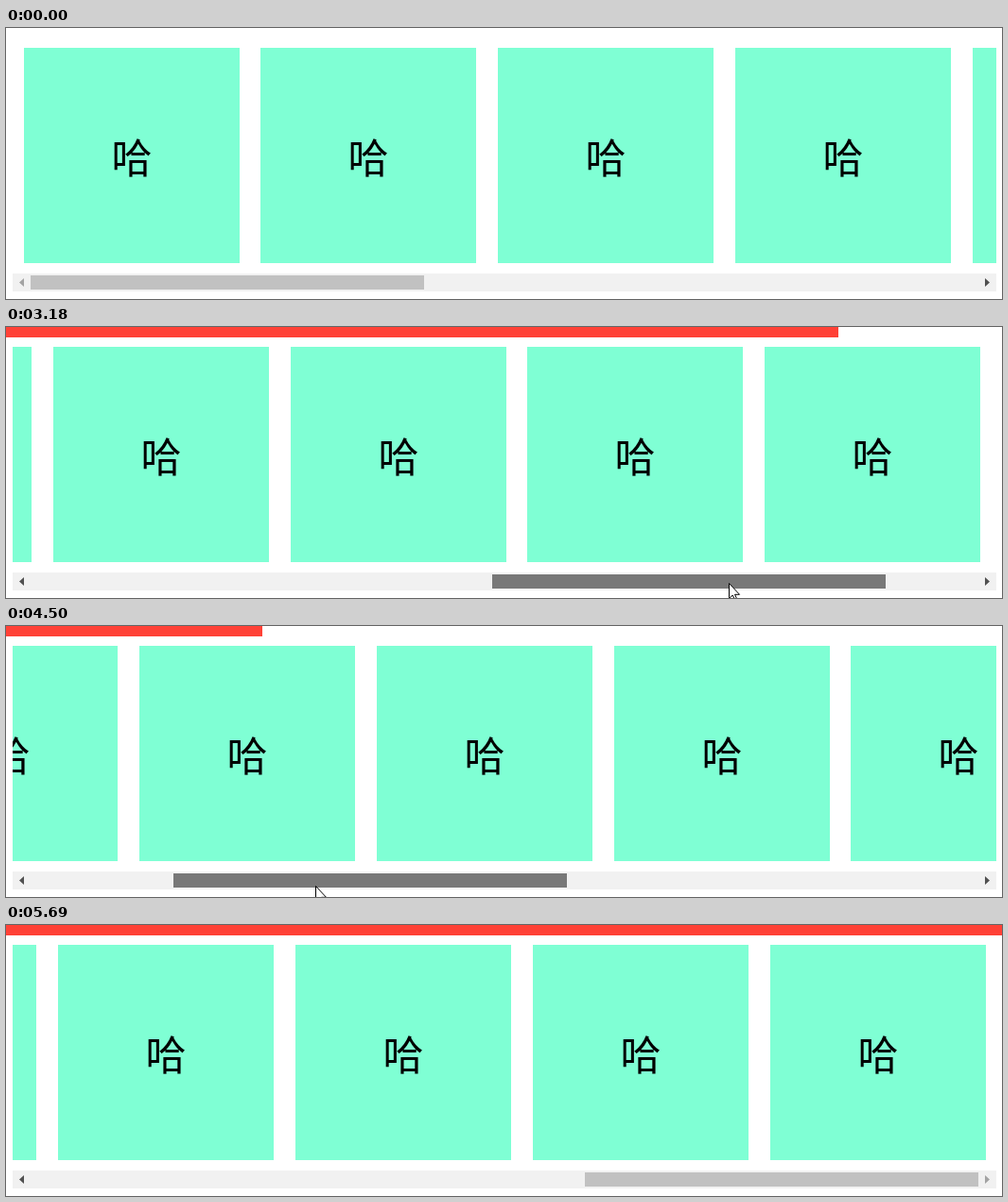
Recreate the animation shown at these times as an HTML page. Size 1053 by 287 pixels, loop 6630 ms.

```html
<!DOCTYPE html>
<html lang="zh-CN">
<head>
<meta charset="utf-8">
<title>Horizontal scroll progress</title>
<style>
  html, body { margin: 0; width: 100%; height: 100%; overflow: hidden; background: #fff; }
  svg { display: block; }
  rect { shape-rendering: crispEdges; }
  text { font: 43px "Noto Sans CJK SC", "Noto Sans CJK", "Noto Sans CJK JP", sans-serif; text-anchor: middle; }
  .card { fill: #7fffd4; }
  .bar { fill: #ff4136; }
  .track { fill: #f1f1f1; }
</style>
</head>
<body>
<svg width="1053" height="287">
  <svg id="list" x="7" y="0" width="1040" height="260" viewBox="7 0 1040 260" overflow="hidden"></svg>
  <rect id="bar" class="bar" height="11"/>
  <rect class="track" x="7" y="260" width="1040" height="19"/>
  <path id="prev" d="M14 269.5l5-4.5v9z"/>
  <path id="next" d="M1040 269.5l-5-4.5v9z"/>
  <rect id="thumb" y="262" width="416" height="15"/>
  <path id="cursor" d="M.5.5v16l3.7-3.5 2.6 5.5 2.2-1-2.5-5.2h5z" fill="#fff" stroke="#000"/>
</svg>
<script>
const LOOP = 6630, MAX = 1468.2, PITCH = 250.8, COUNT = 10;
const ENTER = 1690, HOVER = 1720, GRAB = 2780, RELEASE = 5600, LEAVE = 5680;
const $ = id => document.getElementById(id);
const list = $('list'), bar = $('bar'), thumb = $('thumb'), cursor = $('cursor');

list.innerHTML = Array(COUNT).fill(
  '<g><rect class="card" y="21" width="228" height="228"/><text x="114" y="154">哈</text></g>'
).join('');
const cards = [...list.children];

const clamp = (v, lo, hi) => Math.min(hi, Math.max(lo, v));

const ease = (t, from, to) => {
  const u = clamp((t - from) / (to - from), 0, 1);
  return u * u * (3 - 2 * u);
};

// Three drags: right, back left, right again
const scrollAt = t =>
  MAX * (ease(t, 2837.6, 3300) - ease(t, 3700, 4898.6) + ease(t, 5050, 5420));

// The pointer makes the same sweeps, a little ahead of the thumb
const pointerX = t => 187 + 3 * ease(t, 2300, 2380)
  + 600 * (ease(t, GRAB, 3238) - ease(t, 3476, 4960) + ease(t, 4961, 5430))
  + 270 * ease(t, 5520, LEAVE);

const pointerY = t => 281 - 9 * ease(t, 1700, HOVER) - 2 * ease(t, 2600, 2620)
  + 5 * ease(t, 2900, 3900) - 41 * ease(t, 4500, 5150)
  + 54 * ease(t, 5520, LEAVE);

function thumbColor(t) {
  if (t < HOVER || t >= RELEASE) return '#c1c1c1';
  return t < GRAB ? '#a8a8a8' : '#787878';
}

const arrowColor = off => off ? '#a3a3a3' : '#505050';
const move = (el, x, y) =>
  el.setAttribute('transform', `translate(${Math.round(x)} ${Math.round(y)})`);

function draw(t) {
  const step = t - t % 20;
  const s = scrollAt(step);
  cards.forEach((card, i) => move(card, 18.6 + i * PITCH - s, 0));
  bar.setAttribute('width', Math.round(clamp(0.7218 * s - 2.7, 0, 1053)));
  thumb.setAttribute('x', Math.round(26 + 586 * s / MAX));
  thumb.setAttribute('fill', thumbColor(t));
  $('prev').setAttribute('fill', arrowColor(s < 0.5));
  $('next').setAttribute('fill', arrowColor(s > MAX - 0.5));
  cursor.setAttribute('visibility', t >= ENTER && t < LEAVE ? 'visible' : 'hidden');
  move(cursor, pointerX(step), pointerY(step));
}

const start = performance.now();
function tick() {
  draw((performance.now() - start) % LOOP);
  requestAnimationFrame(tick);
}
tick();
</script>
</body>
</html>
```
